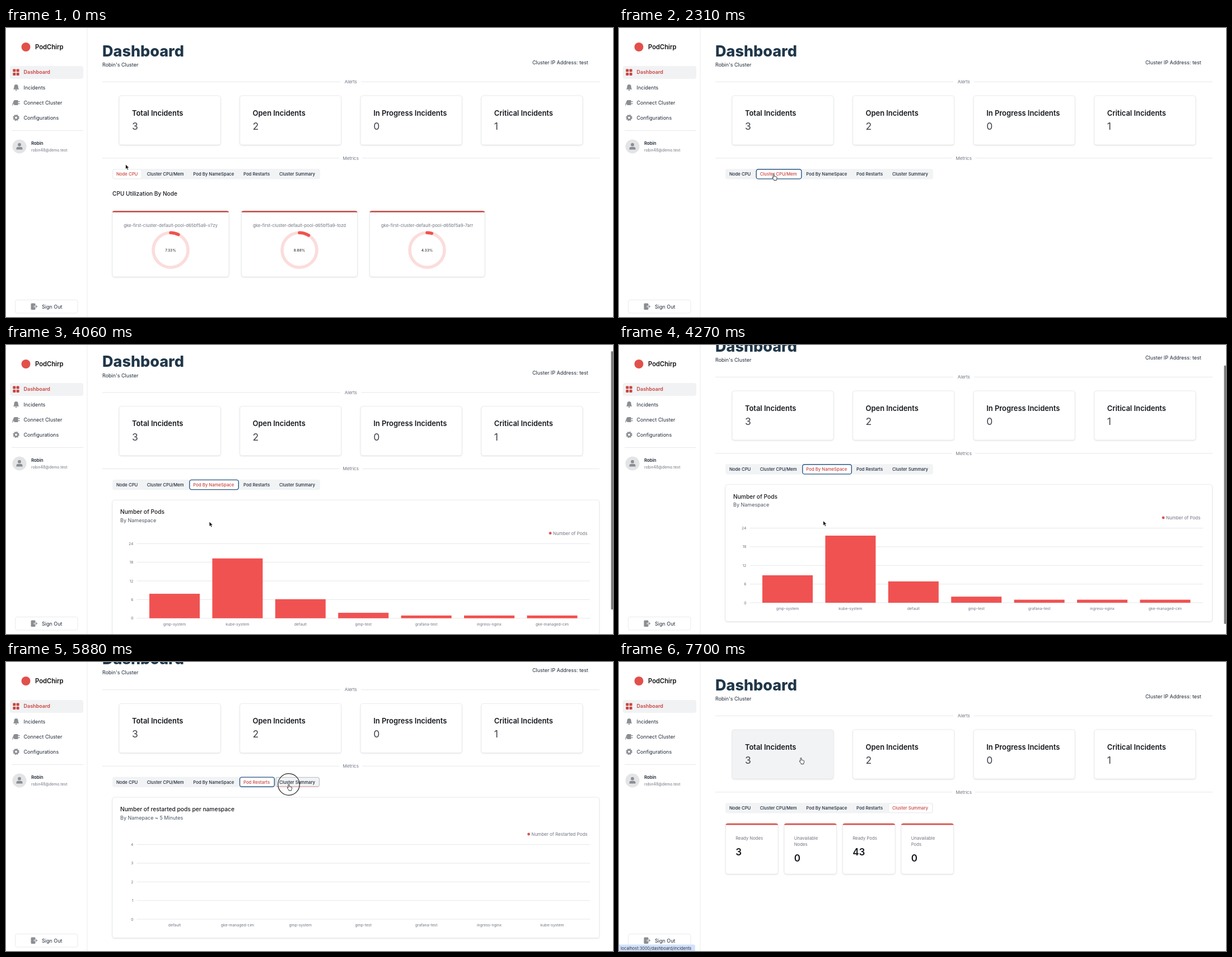
Recreate the animation shown at these times as an HTML page. Size 1084x517 px, loop 8000 ms.

```html
<!DOCTYPE html>
<html lang="en">
<head>
<meta charset="utf-8">
<title>Cluster dashboard</title>
<style>
  html, body { margin: 0; width: 100%; height: 100%; overflow: hidden; background: #fff; }
  svg { display: block; width: 1084px; height: 517px; font-family: Inter, sans-serif; }
  .card { fill: #fff; stroke: #e6e8eb; stroke-width: .8; filter: drop-shadow(0 1px .8px rgba(0, 0, 0, .1)); }
  .hover { fill: #f2f3f5; }
  .line { stroke: #e3e5e8; stroke-width: .9; }
</style>
</head>
<body>
<svg id="stage" viewBox="0 0 1084 517"></svg>
<script>
const LOOP = 8000, TICK = 70;
const RED = '#c8443f', BAR = '#f05252', INK = '#1f2937', GREY = '#6f7580', ICON = '#8b8e93';
const stage = document.getElementById('stage');

const text = (x, y, str, size, fill = INK, weight = 400, anchor = 'start') =>
  `<text x="${x}" y="${y}" font-size="${size}" fill="${fill}" font-weight="${weight}" text-anchor="${anchor}">${str}</text>`;
const rect = (x, y, w, h, r, attrs) =>
  `<rect x="${x}" y="${y}" width="${w}" height="${h}" rx="${r}" ${attrs}/>`;
const line = (x1, x2, y) => `<path class="line" d="M${x1} ${y}H${x2}"/>`;
const card = (x, y, w, h, hover) => rect(x, y, w, h, 4, `class="card${hover ? ' hover' : ''}"`);
const between = (t, a, b) => t >= a && t < b;

// Linear keyframes: rows of [time, ...values]
function track(keys, t) {
  const i = keys.findIndex(k => k[0] > t);
  if (i < 0) return keys[keys.length - 1].slice(1);
  if (i === 0) return keys[0].slice(1);
  const a = keys[i - 1], b = keys[i], p = (t - a[0]) / (b[0] - a[0]);
  return a.slice(1).map((v, j) => v + (b[j + 1] - v) * p);
}

const pointerKeys = [
  [490, 213.5, 244], [700, 228, 252], [980, 262, 268], [1120, 272, 271],
  [1260, 272, 271], [1400, 276.5, 261.5], [2800, 276.5, 261.5], [3150, 345.5, 260],
  [3570, 345.5, 260], [3920, 363, 316], [4130, 363, 316], [4480, 367, 312],
  [4690, 367, 312], [4830, 354, 284], [5040, 410, 236], [5180, 449, 218],
  [5390, 449, 218], [5740, 505, 219], [6370, 505, 219], [6510, 505, 229.5],
  [6650, 505, 229.5], [7000, 415, 192], [7350, 324, 152], [7490, 324, 152], [7700, 325, 171.5]];
const scrollKeys = [[3920, 0], [4060, 11.3], [4130, 22], [4270, 39], [4480, 46.6], [5880, 46.6], [5950, 0]];
// Clicks: [time shown, time hidden, x, y]
const clicks = [[2030, 2170, 279.5, 262.5], [3360, 3430, 346, 260], [5320, 5390, 449, 218], [5880, 5950, 505, 219]];

// Tabs: label, text start, text end, [hover span], [focus span]
const tabs = [
  ['Node CPU', 197, 236, [0, 0], [0, 0]],
  ['Cluster CPU/Mem', 251.7, 319.3, [1680, 2170], [2170, 3360]],
  ['Pod By NameSpace', 334.3, 408.8, [3010, 3360], [3360, 5390]],
  ['Pod Restarts', 424, 472.8, [5110, 5390], [5390, 5950]],
  ['Cluster Summary', 488, 553.4, [5600, 5950], [5950, 7560]]];
const alerts = [['Total', 3], ['Open', 2], ['In Progress', 0], ['Critical', 1]];
const alertX = i => 202 + i * 215.6;
const overAlert = (x, y, i) => between(x, alertX(i), alertX(i) + 181) && between(y, 121, 209);

function sidebar() {
  const person = `<circle cx="24" cy="212" r="12.5" fill="#e3e4e6"/><circle cx="24" cy="208.7" r="2.9" fill="${ICON}"/>
    <path d="M18.5 217.5v-1.5q0-3.2 3.2-3.2h4.6q3.2 0 3.2 3.2v1.5z" fill="${ICON}"/>`;
  const squares = [0, 1, 2, 3].map(i =>
    rect(12.3 + i % 2 * 6.3, 73.6 + (i >> 1) * 6.3, 5, 5, 1, `fill="${RED}"`)).join('');
  const icons = `<g fill="${ICON}">
    <path d="M12.8 109.7q1.7-1.5 1.7-4.7a3.6 3.9 0 0 1 7.2 0q0 3.2 1.7 4.7zM16.3 110.6h3.6a1.8 1.6 0 0 1-3.6 0z"/>
    <path d="M15.5 129h6v2h3.3v1.2h-3.3v2.6h3.3v1.2h-3.3v2h-6q-2.5-.8-2.5-4.5t2.5-4.5z"/>
    <path d="M14 133.4q-2.1.2-2.1 5.4" fill="none" stroke="${ICON}" stroke-width="1.2"/>
    <circle cx="18" cy="160.5" r="3.2" fill="none" stroke="${ICON}" stroke-width="2.6"/>
    <circle cx="18" cy="160.5" r="4.8" fill="none" stroke="${ICON}" stroke-width="1.8" stroke-dasharray="2.3 1.47"/>
    <rect x="44.5" y="492.5" width="8" height="11.5" rx="1.5"/>
    <path d="M49.5 498.2h6m-2-2 2 2-2 2" fill="none" stroke="#fff" stroke-width="2.6"/>
    <path d="M49.5 498.2h6m-2-2 2 2-2 2" fill="none" stroke="${ICON}" stroke-width="1.1"/></g>`;
  return rect(0, 0, 145, 517, 0, 'fill="#fff"') + '<path d="M145 0V517" stroke="#ebedef"/>'
    + `<circle cx="35.5" cy="34" r="8" fill="#e2504a"/>`
    + text(52, 38, 'PodChirp', 11.2, '#111', 600)
    + rect(7, 68, 131, 23, 4, 'fill="#f1f2f4"') + squares
    + text(31.5, 82.3, 'Dashboard', 9, RED, 600)
    + ['Incidents', 'Connect Cluster', 'Configurations'].map((s, i) => text(31.5, 109.7 + i * 27.05, s, 9)).join('')
    + line(10, 138, 183.5) + person
    + text(45, 209, 'Robin', 7.9, INK, 600) + text(45, 221, 'robin48@demo.test', 6.9, GREY)
    + rect(16.5, 486.5, 111.5, 23.5, 3.5, 'fill="#fff" stroke="#e6e8eb" stroke-width=".9"')
    + icons + text(64, 501.5, 'Sign Out', 9);
}

function header(x, y) {
  const rule = (label, mid, half) => line(172, 615.7 - half, mid) + line(615.7 + half, 1060, mid)
    + text(615.7, mid + 2.8, label, 8, GREY, 400, 'middle');
  return text(172, 50.8, 'Dashboard', 27, '#20374a', 800)
    + text(172, 69, 'Robin\'s Cluster', 9) + text(940, 64.8, 'Cluster IP Address: test', 9)
    + rule('Alerts', 96.3, 18.5) + rule('Metrics', 232.8, 20.5)
    + alerts.map(([name, n], i) => card(alertX(i), 121, 181, 88, overAlert(x, y, i))
      + text(alertX(i) + 23, 156.8, name + ' Incidents', 12.9, '#16181d', 600)
      + text(alertX(i) + 23, 182, n, 17.5, '#3c4149')).join('');
}

function tabBar(t, active) {
  return rect(190, 252, 371, 18.6, 4, 'fill="#f1f3f5"') + tabs.map(([label, a, b, hover, focus], i) => {
    const box = attrs => rect(a - 6, 253, b - a + 12, 16.6, 3, attrs);
    let out = '';
    if (i === active) out += box('fill="#fff" stroke="#e8eaed" stroke-width=".7"');
    if (between(t, ...hover)) out += box('fill="none" stroke="#b9bdc3"')
      + `<path d="M${a - 4} 269.6H${b + 4}" stroke="#e9a5a2"/>`;
    if (between(t, ...focus)) out += rect(a - 6.5, 252.7, b - a + 13, 17.2, 3.5,
      `fill="${i === active ? '#fff' : 'none'}" stroke="#265684" stroke-width="1.4"`);
    if (between(t, 3360, 3500) && i === 2) out += `<path d="M${a - 4} 269.8H${b + 4}" stroke="#b23a3a" stroke-width="1.4"/>`;
    return out + text(a, 264.2, label, 7.75, i === active ? RED : INK, 500);
  }).join('');
}

const redTop = (x, y, w, fill) =>
  `<path d="M${x} ${y + 2.4}q0-2.6 4-2.6h${w - 8}q4 0 4 2.6z" fill="${fill}"/>`;

function nodes() {
  const list = [['v7zy', 7.33, 190, 208, 294], ['tozd', 8.88, 420.5, 207, 524], ['7arr', 4.33, 649.5, 205.5, 752]];
  return text(190, 300, 'CPU Utilization By Node', 10.1, '#16181d', 500) + list.map(([id, pct, x, w, cx]) => {
    const ring = (color, extra) => `<circle cx="${cx}" cy="397.2" r="31" fill="none" stroke="${color}" stroke-width="5.6" ${extra}/>`;
    return card(x, 327.5, w, 117.5) + redTop(x, 327.3, w, '#c25552')
      + text(cx, 355.8, 'gke-first-cluster-default-pool-d65bf5a9-' + id, 7.75, GREY, 400, 'middle')
      + ring('#fbdddb', '')
      + ring('#ef5350', `pathLength="100" stroke-dasharray="${pct} 100" stroke-linecap="round" transform="rotate(-90 ${cx} 397.2)"`)
      + text(cx, 399.6, pct + '%', 6.5, '#30343b', 500, 'middle');
  }).join('');
}

function chart(title, sub, legend, dotX, max, names, values, drop, grow, plot) {
  const base = 500.1 + drop, unit = 133.5 / max;
  let out = card(190, 288.6, 869.5, 245 + drop)
    + text(204, 313.6, title, 10.2, '#16181d', 500) + text(204, 328.4, sub, 9, '#4b5563');
  if (!plot) return out;
  out += `<circle cx="${dotX}" cy="${348 + drop}" r="2.4" fill="#d9534f"/>`
    + text(1038.5, 351 + drop, legend, 8, GREY, 400, 'end');
  for (let i = 0; i <= 4; i++) {
    const y = base - i * 133.5 / 4;
    out += line(233.5, 1043, y) + text(227.5, y + 2.5, i * max / 4, 6.8, GREY, 400, 'end');
  }
  return out + names.map((name, i) => {
    const cx = 301 + i * 112.4, h = (values[i] || 0) * unit * grow;
    return (h ? rect(cx - 45, base - h, 90, h, 0, `fill="${BAR}"`) : '')
      + text(cx, base + 12.9, name, 6.8, GREY, 400, 'middle');
  }).join('');
}

function pods(t) {
  const p = Math.min(1, Math.max(0, (t - 3565) / 900));
  return chart('Number of Pods', 'By Namespace', 'Number of Pods', 972, 24,
    ['gmp-system', 'kube-system', 'default', 'gmp-test', 'grafana-test', 'ingress-nginx', 'gke-managed-cim'],
    [9, 22, 7, 2, 1, 1, 1], 0, 1 - (1 - p) ** 2.6, t >= 3500);
}

const restarts = () => chart('Number of restarted pods per namespace', 'By Namepace ~ 5 Minutes',
  'Number of Restarted Pods', 933.5, 4,
  ['default', 'gke-managed-cim', 'gmp-system', 'gmp-test', 'grafana-test', 'ingress-nginx', 'kube-system'],
  [], 6.6, 1, true);

function summary() {
  return [['Ready Nodes', 3], ['Unavailable Nodes', 0], ['Ready Pods', 43], ['Unavailable Pods', 0]].map(([label, n], i) => {
    const x = 190.5 + i * 104.5, rows = i % 2 ? label.split(' ') : [label];
    return card(x, 289, 93.5, 90.3) + redTop(x, 289, 93.5, '#d9534f')
      + rows.map((s, j) => text(x + 17.7, 317.6 + j * 11.3, s, 7.75, GREY)).join('')
      + text(x + 17.7, 334.6 + rows.length * 11.3, n, 17, '#16181d', 600);
  }).join('');
}

function pointer(t, x, y, scroll) {
  const onTab = tabs.some(([, a, b]) => between(x, a - 6, b + 6)) && between(y + scroll, 252, 270.5);
  const onCard = alerts.some((_, i) => overAlert(x, y + scroll, i));
  const hand = onTab || onCard || between(t, 5700, 6440);
  return `<g transform="translate(${x} ${y})" stroke-linejoin="round">` + (hand
    ? '<path d="M-1 .9q0-1 1-1t1 1v3.2q.9-.6 1.6.2 1-.4 1.6.4 1.3-.3 1.3 1.1v1.6q0 1.3-.8 2.3v1.3h-4.6v-1.1q-1.4-1.2-2.7-3.7-.3-1.1.7-1.1l.9.9z" fill="#fff" stroke="#222" stroke-width=".9"/>'
    : '<path d="M0 0v8.6l2-1.8 1.4 3.2 1.7-.7-1.4-3.2h2.7z" fill="#111" stroke="#fff" stroke-width=".7"/>') + '</g>';
}

function draw(t) {
  const [x, y] = track(pointerKeys, t), [scroll] = track(scrollKeys, t);
  const view = [2170, 3430, 5390, 5950].filter(s => t >= s).length;
  const active = view === 2 && t < 3500 ? 1 : view;
  const content = [nodes, () => '', pods, restarts, summary][view](t);
  const thumb = between(t, 3990, 5950) ? Math.min(1, Math.max(0, (5040 - t) / 280)) : 0;
  const ring = clicks.find(c => between(t, c[0], c[1]));
  return `<g transform="translate(0 ${-scroll})">${header(x, y + scroll)}${tabBar(t, active)}${content}</g>`
    + sidebar()
    + rect(1080.5, scroll * .925 + .5, 3.5, 462.5, 1.7, `fill="#7b7b7b" opacity="${thumb}"`)
    + (t >= 7560 ? `<path d="M0 505.5H133q3 0 3 3V517H0z" fill="#d3e2fb"/>` + text(3, 514.8, 'localhost:3000/dashboard/incidents', 7.4, '#28323f') : '')
    + (ring ? `<circle cx="${ring[2]}" cy="${ring[3]}" r="19.3" fill="none" stroke="#222" stroke-width="1.2"/>` : '')
    + pointer(t, x, y, scroll);
}

let shown = -1;
function frame(now) {
  const t = Math.floor(now % LOOP / TICK) * TICK;
  if (t !== shown) stage.innerHTML = draw(shown = t);
  requestAnimationFrame(frame);
}
frame(performance.now());
</script>
</body>
</html>
```
